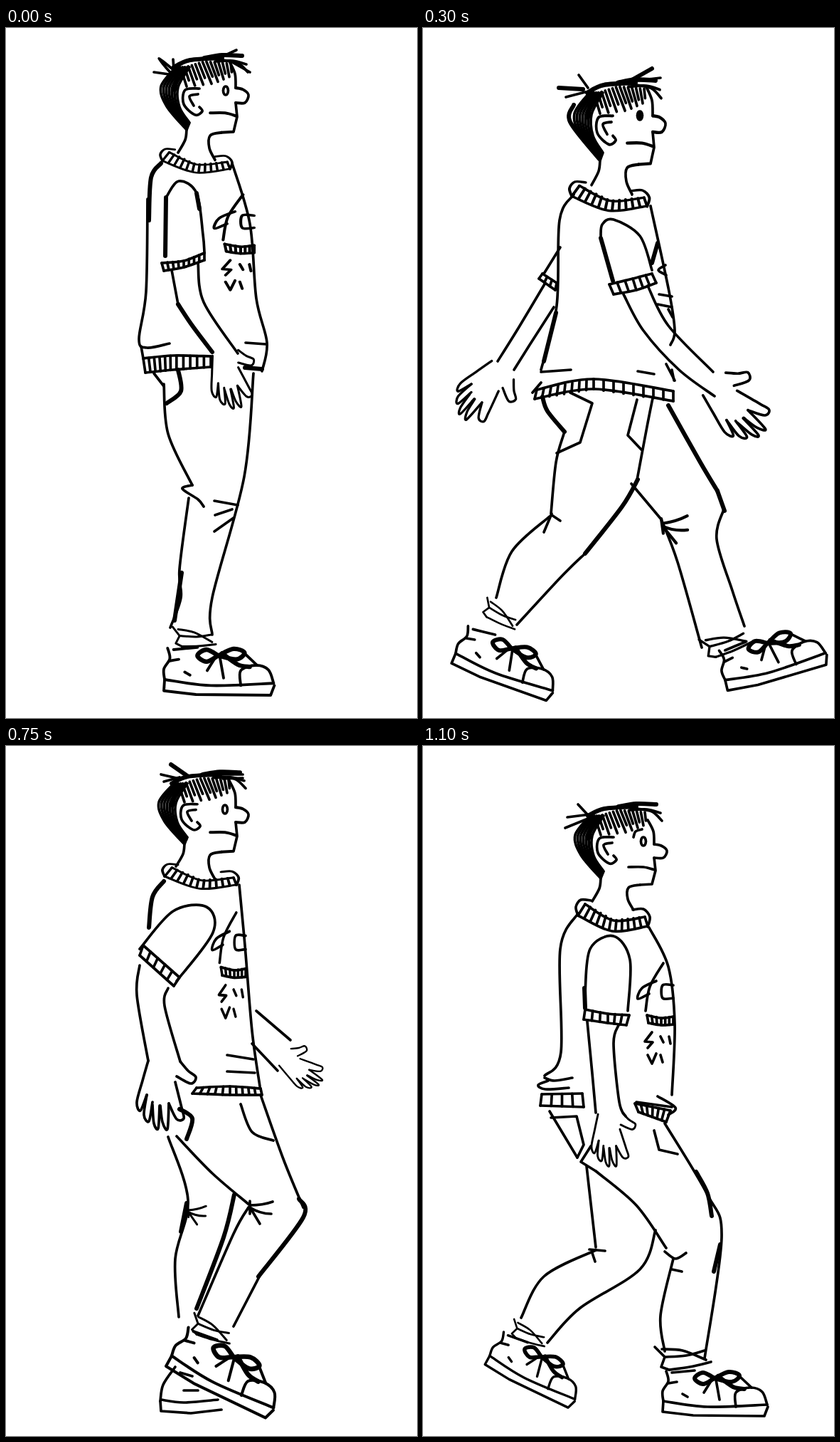
An HTML page for the animation above (1.25 s loop, 578 px wide and 969 px high).

```html
<!DOCTYPE html>
<html lang="en">
<head>
<meta charset="utf-8">
<title>Walk cycle</title>
<style>
html, body { margin: 0; width: 100%; height: 100%; overflow: hidden; background: #fff; }
svg { display: block; width: 100%; height: 100%; }
path { fill: none; stroke: #000; stroke-width: 3.7; stroke-linecap: round; stroke-linejoin: round; }
.bold { stroke-width: 6; }
.solid { fill: #000; }
</style>
</head>
<body>
<svg id="stage" viewBox="0 0 578 969"></svg>
<script>
const LOOP = 1250;
let layer = document.getElementById('stage');

const add = (name, attrs = {}) => {
  const node = document.createElementNS('http://www.w3.org/2000/svg', name);
  for (const key in attrs) node.setAttribute(key, attrs[key]);
  return layer.appendChild(node);
};
const inGroup = (transform, draw) => {
  const parent = layer;
  const group = layer = add('g', { transform });
  draw();
  layer = parent;
  return group;
};
const shift = (x, y, draw) => inGroup(`translate(${x} ${y})`, draw);

const readPoints = text => {
  const n = text.match(/\d+/g).map(Number);
  return n.filter((_, i) => i % 2 === 0).map((x, i) => [x, n[2 * i + 1]]);
};
const mix = (a, b, t) => a.map((v, k) => v + (b[k] - v) * t);
const straight = pts => 'M' + pts.join('L');
const trace = (d, style = '') => add('path', { d, class: style });

// Smooth curve through all points
function smooth(pts) {
  const at = i => pts[Math.max(0, Math.min(pts.length - 1, i))];
  let d = 'M' + pts[0];
  for (let i = 0; i < pts.length - 1; i++) {
    const [a, b, c, e] = [at(i - 1), at(i), at(i + 1), at(i + 2)];
    d += `C${b.map((v, k) => v + (c[k] - a[k]) / 6)} ${c.map((v, k) => v - (e[k] - b[k]) / 6)} ${c}`;
  }
  return d;
}
function pointAt(pts, t) {
  const u = t * (pts.length - 1), i = Math.min(Math.floor(u), pts.length - 2);
  return mix(pts[i], pts[i + 1], u - i);
}

// Strokes separated by "/": plain is smooth, "b" bold, "p" straight edges
function ink(text) {
  for (const stroke of text.split('/')) {
    const pts = readPoints(stroke), kind = stroke.trim()[0];
    trace(kind === 'p' ? straight(pts) : smooth(pts), kind === 'b' ? 'bold' : '');
  }
}
function ticks(n, from, to, shortest = 1) {
  const [a, b] = [from, to].map(readPoints);
  for (let i = 0; i <= n; i++) {
    const top = pointAt(a, i / n);
    trace(straight([top, mix(top, pointAt(b, i / n), i % 2 ? shortest : 1)]));
  }
}
function band(n, top, bottom) {
  ink(top);
  ink(bottom);
  ticks(n, top, bottom);
}
function strands(n, from, to) {
  const [a, b] = [from, to].map(readPoints);
  for (let i = 0; i <= n; i++) trace(smooth(a.map((p, k) => mix(p, b[k], i / n))));
}
const eye = (x, y, style = '') => trace(`M${x} ${y - 6}a3.5 6 0 1 1 -.1 0z`, style);

// A reusable drawing, placed by its pivot
const stamp = (px, py, draw) => (x, y, turn = 0, sx = 1, sy = sx) =>
  inGroup(`translate(${x} ${y}) rotate(${turn}) scale(${sx} ${sy}) translate(${-px} ${-py})`, draw);

const face = stamp(343, 147, () => {
  ink('316 104 324 120 325 138/325 138 335 140 343 147 338 157 325 157/p325 157 327 175 322 194 305 195');
  ink('305 195 289 199 288 215 296 230/289 170 310 170 326 174');
});
const hair = stamp(250, 186, () => {
  ink('b232 98 255 88 300 85/b275 85 300 81 328 82/290 90 315 89 334 94/300 88 322 92 336 105/b238 104 233 130');
  strands(6, '235 98 214 125 222 153 250 186', '254 98 238 126 240 154 254 176');
  ticks(13, '242 100 275 90 312 93', '250 125 288 121 314 110', 0.7);
  ink('268 128 248 130 246 150 262 165 272 160 268 154/266 136 254 139 260 152/250 185 248 200 238 218');
});
const collar = stamp(215, 216, () => {
  band(11, '228 222 268 245 312 240', '218 238 266 260 316 253');
  ink('236 217 222 216 215 226 218 238/295 230 310 229 319 240 316 254');
});
const rocket = stamp(302, 305, () => {
  ink('338 305 319 338 313 372/328 330 308 340 302 355 318 348/352 336 337 336 337 354 352 354');
  band(6, '315 378 335 382 352 380', '317 389 335 392 352 391');
  ink('p322 402 312 415 323 416 316 424/p316 434 322 446 328 432/334 408 338 416/346 408 348 418/334 434 337 444');
});
const hand = stamp(222, 442, () => {
  ink('245 443 256 456 267 465 260 474 240 464/200 442 192 470 184 500 189 512 198 490');
  ink('198 490 194 518 201 527 206 500/206 504 208 530 214 537 216 505');
  ink('217 505 220 528 227 538 229 502/229 502 240 524 250 523 247 508 238 472');
});
const shoe = stamp(337, 920, () => {
  ink('342 878 345 892 337 906 338 920/p338 920 337 935 380 940 480 941 485 928/338 920 400 928 484 925');
  ink('440 928 440 908 460 901 477 907 484 925/350 880 382 877/445 885 462 901');
  ink('b410 888 394 880 382 888 394 896 410 888 430 879 445 884 434 893 410 888');
  ink('405 892 395 908/412 890 417 918/b415 885 436 900 452 903/345 895 357 893/365 910 372 914');
});
const cuff = stamp(365, 858, () => {
  ink('p326 844 340 858 335 872 346 876/340 858 370 856 396 849/346 876 375 872 405 865/336 847 365 849 398 862');
});
const knee = stamp(0, 0, () => {
  trace('M0 0Q18 0 32 -5M0 3Q14 12 30 12M2 6L14 26M0 -6V12');
});

// Upright, legs together
function standBody() {
  face(341, 94, 0, 1, 1.1);
  eye(309, 88);
  hair(254, 143);
  ink('237 60 215 43 234 66/208 62 236 66/235 44 236 58/300 42 324 31/318 48 343 62');
  collar(217, 170, 0, 0.97, 0.75);
  ink('b218 190 204 210 201 270/199 240 197 370 187 437 198 449 230 443');
  ink('318 190 343 275 352 380 367 442 360 482/190 447 193 464/b336 477 360 479/337 442 365 444');
  band(11, '193 464 235 460 288 461', '196 484 235 480 288 476');
  rocket(293, 234, 0, 1.12, 0.95);
}
function standArm() {
  ink('b224 320 225 238/225 238 243 215 268 232 277 290 279 315/b268 232 272 254');
  band(8, '219 330 250 327 279 316', '222 341 250 336 279 326');
  ink('233 340 242 388/b242 388 262 418 290 455/270 330 278 385 326 457');
  hand(308, 456, -14, 0.82);
}
function standLegs() {
  ink('208 485 222 503/b242 480 246 510 226 527/222 500 228 570 262 642/262 642 248 647 270 662 278 672');
  ink('257 660 244 760 246 800 231 842/b247 765 237 832/348 485 335 630 290 800 290 852');
  ink('293 664 326 670/294 684 318 676/293 707 320 688');
  cuff(264, 856, 7, 0.8);
  shoe(222, 915, 0, 1.05);
}
function stand() {
  standBody();
  standArm();
  standLegs();
}

// Wide stride, near arm ahead
function strideArm() {
  ink('b267 355 250 295/250 295 252 276 268 269 305 292 322 340');
  band(6, '262 360 295 352 322 345', '268 374 300 368 328 358');
  ink('282 374 310 425 360 480 410 517/316 362 345 418 408 483');
  hand(409, 500, -46);
}
function wideFeet() {
  ink('181 682 170 708/181 684 193 692/178 686 125 735 103 800/228 738 195 770 132 838');
  ink('b414 650 424 678/423 676 413 718 435 790 452 840/335 690 358 750 392 870');
  knee(336, 696, -8, 1.15);
  cuff(108, 824, 34, 0.72);
  shoe(45, 878, 19);
  cuff(425, 864, -12, 0.9);
  shoe(424, 916, -17);
}
function strideA() {
  face(341, 134, 0, 1, 1.2);
  eye(305, 123, 'solid');
  hair(249, 186, 0, 1, 1.08);
  ink('b191 84 225 86/219 66 232 84/201 97 228 90/b290 75 322 57/300 74 334 70/b212 108 207 132 248 184');
  collar(206, 216, 0, 1.08, 0.92);
  ink('212 234 192 270 188 390 166 480/b187 400 170 468/320 250 346 370 354 425 348 445/350 480 353 495');
  ink('166 483 208 480/302 482 325 486/342 472 354 495/166 498 154 512');
  band(16, '160 508 240 493 352 510', '157 521 240 507 352 524');
  ink('b330 302 322 330/341 333 331 340 342 347/332 374 350 377/330 388 350 392/345 395 351 406');
  ink('193 308 170 345/172 358 135 420 105 468/184 392 150 445 128 480');
  band(3, '168 345 188 358', '163 352 186 368');
  hand(112, 480, 39, 0.9);
  strideArm();
  ink('p207 512 238 527 221 582 188 597/b168 518 175 538 199 567/198 570 187 610 180 682/p301 522 288 572 307 592');
  ink('323 520 315 560 300 640/b302 634 280 672 228 738/b345 530 390 610 414 650/293 640 335 690');
  wideFeet();
}

function downA() {
  face(336, 147, 0, 1, 0.95);
  eye(306, 131, 'solid');
  ink('298 124 304 120 312 122');
  hair(248, 177, 0, 1, 1.02);
  ink('220 62 232 82/202 86 232 85/228 60 234 78/285 72 325 74 342 88/300 78 340 98');
  collar(205, 204, 0, 0.98, 0.92);
  ink('212 228 176 258 177 320 156 488/156 488 168 494 204 488/174 490 157 515 172 517/305 240 322 340 341 470');
  band(14, '170 517 250 511 318 512', '178 533 250 521 322 524');
  rocket(292, 308, 0, 0.72, 0.9);
  ink('229 358 220 290 240 254/249 254 281 285 292 355');
  band(6, '228 360 260 361 293 357', '232 375 260 374 291 372');
  ink('238 375 240 395 318 505/283 372 284 392 335 472');
  hand(327, 488, -31, 0.98);
  ink('p196 535 208 571 229 565 227 527/182 530 212 582 229 690/p296 532 292 568 313 582');
  ink('314 524 308 640 295 718 230 768 168 830/228 698 160 742 124 796');
  ink('360 576 395 670 385 740 379 845/308 665 333 705 324 770 333 850');
  knee(229, 695, 0, 0.7);
  knee(330, 697, 0, 0.8);
  cuff(137, 820, 26, 0.72);
  shoe(78, 842, 32, 0.92);
  cuff(355, 862, 0, 0.85);
  shoe(322, 910, 6);
}

// Legs crossing, one knee raised
function passingLegs() {
  ink('228 549 256 638 238 720 243 802/b254 642 246 682/b321 630 306 690 268 790');
  ink('240 548 290 600 343 645/341 648 320 685 270 800/358 490 390 580 418 648');
  ink('b412 636 418 662 355 745/360 738 320 815/330 503 346 542 376 554/b244 510 262 523 254 552');
  knee(256, 652, -4, 0.8);
  knee(343, 645, 0);
  cuff(288, 820, 26, 0.8);
  shoe(232, 856, 25, 1.1);
  ink('238 872 221 897 217 920/p217 920 218 934 260 937 303 932/218 918 250 922 298 918/245 880 262 885/250 905 270 905');
}
function passing() {
  face(341, 96, 0, 1, 1.1);
  eye(308, 89);
  hair(251, 138, 0, 1, 0.97);
  ink('b232 26 255 42/218 40 244 46/222 50 244 44/300 40 333 40/305 46 333 45');
  collar(220, 166, 0, 1.03, 0.78);
  ink('b222 190 206 212 201 255/328 195 336 280 346 400 357 478/311 434 348 440/311 457 350 459');
  band(10, '268 480 315 478 358 481', '262 488 315 490 360 490');
  rocket(290, 234, 0, 0.94, 1.05);
  ink('188 285 235 232 282 226 291 262 240 330');
  band(5, '193 280 244 325', '188 294 236 337');
  ink('188 308 184 350 200 442/228 340 223 365 245 443');
  hand(222, 442);
  ink('352 372 400 413/346 418 382 456');
  hand(392, 437, -56, 0.64);
  passingLegs();
}

// Forward pass of the other leg
function passingSwap() {
  shift(0, -10, standBody);
  inGroup('translate(-14 -60) rotate(8 272 280)', strideArm);
  shift(0, -5, passingLegs);
  ink('200 300 183 380 190 430 177 490 195 486/205 475 228 546');
}

function strideB() {
  face(346, 154, 0, 1, 0.92);
  eye(314, 140, 'solid');
  ink('303 132 310 125 318 122');
  hair(252, 198, 0, 1, 1.1);
  ink('b232 67 243 90/206 90 238 96/206 105 235 100/b290 92 315 86 340 93/315 85 352 97');
  collar(206, 217, 0, 1.06, 1);
  ink('212 240 187 280 191 335/b313 255 323 320/323 320 338 400 338 490/b338 420 338 488/193 440 178 502');
  band(15, '180 507 260 495 350 512', '186 520 265 508 350 526');
  ink('300 485 345 489 357 500 345 510');
  rocket(278, 302, 0, 0.98);
  ink('b190 340 206 318/180 352 232 285 258 271 278 305 232 405');
  band(6, '184 352 232 402', '177 365 230 413');
  ink('185 375 158 435 148 492 130 530/215 405 193 455 175 530');
  hand(152, 530, 24, 0.86);
  ink('b340 412 360 430/360 430 410 457 440 461/342 462 415 508');
  hand(412, 482, -62, 0.9);
  ink('p193 540 219 532 225 555 236 574 228 598/b184 520 195 560 232 602/232 602 280 640 332 695');
  ink('b190 565 178 680/b290 652 250 700 226 742/b346 526 390 605 412 650/300 515 325 548 355 554 348 535');
  shift(-3, 0, wideFeet);
}

function downB() {
  face(343, 147);
  eye(310, 134);
  ink('296 128 299 120 308 117');
  hair(250, 186);
  ink('218 82 232 97/203 100 235 96/200 115 232 102');
  collar(215, 216);
  ink('218 235 193 285 194 430 171 463/171 466 185 470 210 466/176 470 162 476 172 482 205 480');
  band(4, '167 489 224 488', '165 505 226 507');
  band(6, '298 502 348 512', '303 514 342 528');
  ink('300 500 350 507/330 492 355 508 345 518/318 255 345 310 354 390 350 490');
  rocket(302, 305);
  ink('b228 368 227 340/228 345 235 285 268 267 291 300 288 372');
  band(6, '228 370 260 376 290 378', '226 384 260 389 286 392');
  ink('231 387 238 460 243 515/275 392 268 418 276 500 285 520');
  hand(263, 516, -4, 0.77);
  ink('178 513 217 578/p180 522 216 520 226 560 217 578/p236 562 222 584 243 597/243 597 300 645 342 705');
  ink('230 590 243 704/243 708 170 745 138 803/327 680 305 735 220 790 175 838/p325 540 332 567 358 573');
  ink('340 530 400 630 420 690 396 860/b384 598 400 628 406 660/b418 700 409 738/352 720 334 800 340 850');
  ink('234 707 256 709/238 712 242 724/340 710 355 720 370 712/350 735 364 738');
  cuff(148, 826, 27, 0.7);
  shoe(93, 856, 25, 0.92);
  cuff(365, 858);
  shoe(337, 920);
}

const steps = [
  [stand, 150],
  [passingSwap, 150],
  [strideA, 150],
  [downA, 150],
  [() => shift(0, -2, stand), 150],
  [passing, 200],
  [strideB, 150],
  [downB, 150]
];

let start = 0;
for (const [draw, hold] of steps) {
  const offset = hold / LOOP;
  inGroup('', draw).animate([
    { visibility: 'visible', offset: 0 },
    { visibility: 'visible', offset },
    { visibility: 'hidden', offset },
    { visibility: 'hidden', offset: 1 }
  ], { duration: LOOP, delay: start ? start - LOOP : 0, iterations: Infinity });
  start += hold;
}
</script>
</body>
</html>
```
